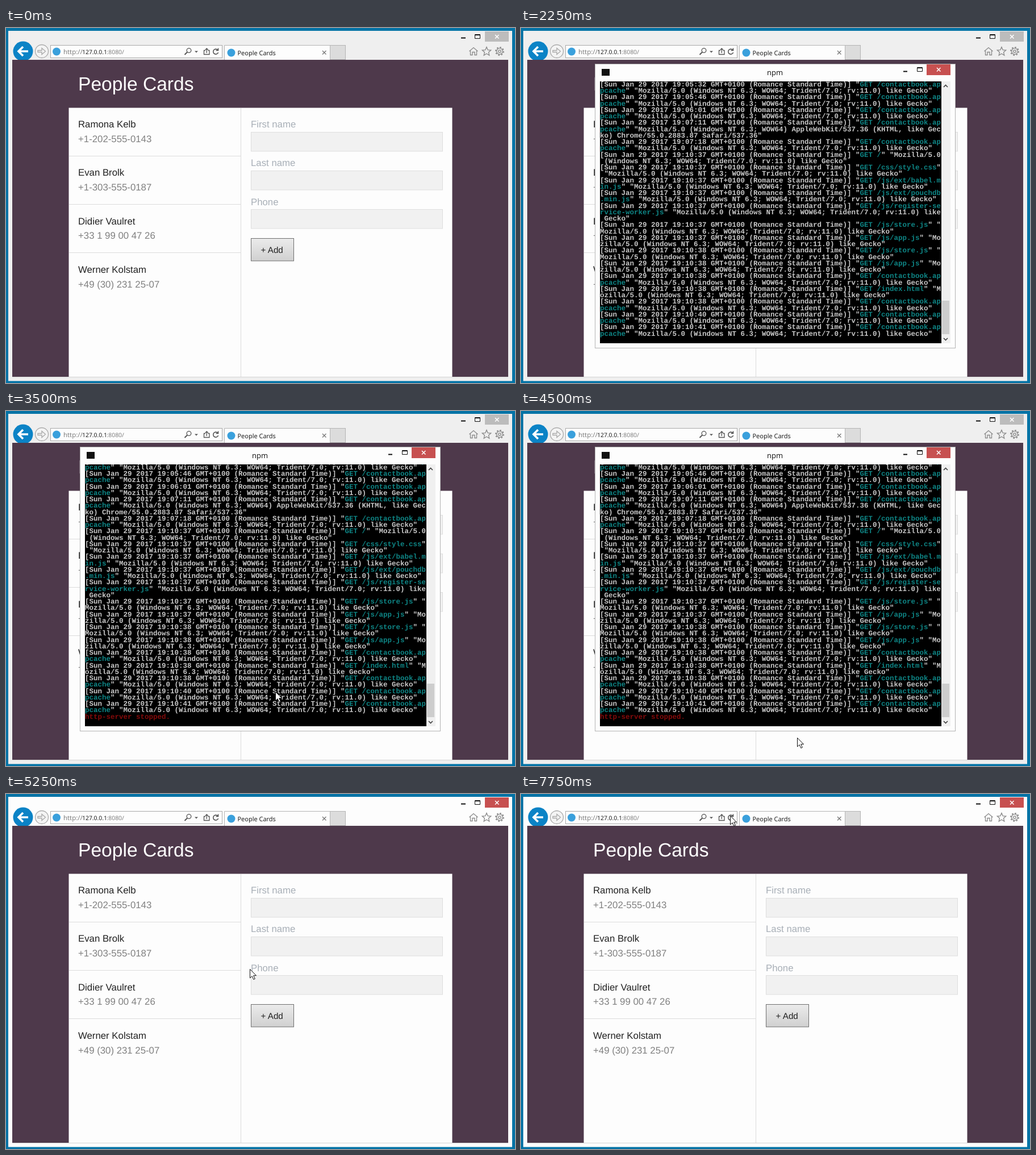
Recreate the animation shown at these times as an HTML page. Size 896 by 625 pixels, loop 8000 ms.

```html
<!DOCTYPE html>
<html lang="en">
<head>
<meta charset="utf-8">
<title>People Cards</title>
<style>
html, body { margin: 0; width: 100%; height: 100%; overflow: hidden; background: #0273a6; }
svg { display: block; width: 896px; height: 625px; text-rendering: geometricPrecision; }
.page { font: 16.8px "Liberation Sans", Arial, sans-serif; }
.ui { font: 11px "Open Sans", "Noto Sans", sans-serif; fill: #111; }
.url { font-size: 10.4px; }
.url .dim { fill: #777; }
.log { font: bold 12.5px "Liberation Mono", monospace; fill: #c8c8c8; }
.log text { white-space: pre; }
.log tspan { fill: #0e8585; }
.icon { fill: none; stroke: #777; stroke-width: 1.3; }
</style>
</head>
<body>
<svg viewBox="0 0 896 625">
  <defs>
    <linearGradient id="button" x2="0" y2="1">
      <stop stop-color="#ebebeb"/><stop offset="1" stop-color="#d0d0d0"/>
    </linearGradient>
  </defs>

  <rect width="896" height="625" fill="#0273a6"/>
  <rect id="frame" x="4" y="5" width="887" height="616.5"/>

  <g class="ui">
    <path d="M801 17.5h8" stroke="#111" stroke-width="2"/>
    <path d="M825.5 11.5h9v7h-9zM825.5 12.5h9" fill="none" stroke="#111"/>
    <rect id="close" x="843" y="6" width="42" height="18"/>
    <path d="M861 12l6.5 6.5m0-6.5l-6.5 6.5" stroke="#fff" stroke-width="1.5"/>

    <circle cx="30" cy="41" r="17.5" fill="#0b83c6"/>
    <path d="M39 41H22m8-8l-8 8 8 8" fill="none" stroke="#fff" stroke-width="3.6"/>
    <g class="icon" style="stroke:#aaa">
      <circle cx="63" cy="41" r="11.5" fill="#f4f4f4"/>
      <path d="M56 39.5h7v-4l6.5 5.5-6.5 5.5v-4h-7z"/>
    </g>

    <rect x="78.5" y="30.5" width="302" height="22" fill="#fdfdfd" stroke="#a9a9a9"/>
    <circle cx="89" cy="41.5" r="7" fill="#3aa0dc"/>
    <text class="url" y="46"><tspan class="dim" x="101" font-size="11.5">http://</tspan><tspan x="134">127.0.0.1</tspan><tspan class="dim" x="177.5">:8080/</tspan></text>
    <g class="icon" style="stroke:#555">
      <circle cx="322" cy="39.5" r="3.8"/><path d="M319 42.5l-4.5 4.5" stroke-width="2"/>
      <path d="M332 40.5h6l-3 3z" fill="#555" stroke="none"/>
      <path d="M351 39.5h-2.5v7h9.5v-7h-2.5M353.3 44v-8m-2.5 2.5l2.5-2.5 2.5 2.5"/>
      <path id="refresh" d="M373 39a4.5 4.5 0 1 0 .6 4M373.5 35.5v4h-4" stroke-width="1.6"/>
      <path id="stop" d="M365.5 38l7 7m0-7l-7 7" stroke="#b0333f" stroke-width="2"/>
    </g>

    <path d="M384.5 56V30.5h186V56" fill="#fdfdfd" stroke="#b5b5b5"/>
    <rect x="570.5" y="30.5" width="27" height="25" fill="#dcdcdc" stroke="#b5b5b5"/>
    <circle id="favicon" cx="396.5" cy="43.5" r="7" fill="#3aa0dc"/>
    <circle id="spinner" cx="396.5" cy="43.5" r="4.7" fill="none" stroke="#777" stroke-width="2" stroke-dasharray="24 5.5"/>
    <text x="407.5" y="48">People Cards</text>
    <path class="icon" d="M557 40l6.5 6.5m0-6.5l-6.5 6.5"/>

    <g class="icon" style="stroke:#8a8a8a">
      <path d="M815.5 41l7.5-6.5 7.5 6.5M817.5 40v7.5h3.5v-5h4v5h3.5V40"/>
      <path d="M846 33.5l2.2 5.1 5.5.5-4.2 3.6 1.3 5.4-4.8-2.9-4.8 2.9 1.3-5.4-4.2-3.6 5.5-.5z"/>
      <circle cx="869" cy="41" r="5.3"/><circle cx="869" cy="41" r="2.2"/>
      <circle cx="869" cy="41" r="6.9" stroke-width="2" stroke-dasharray="2.7 2.72"/>
    </g>
  </g>

  <rect x="11" y="56" width="873" height="559" fill="#4e394b"/>
  <g class="page">
    <text x="127" y="109.5" fill="#fff" font-size="33.6">People Cards</text>
    <rect x="110.5" y="140.5" width="675" height="474.5" fill="#fdfdfd"/>
    <path d="M413.5 141v474M111 225.5h302m-302 85h302m-302 85h302" stroke="#dcdcdc"/>
    <g id="contacts"></g>
    <g id="fields"></g>
    <rect x="431.5" y="370.5" width="75" height="39.5" fill="url(#button)" stroke="#6f6f6f"/>
    <text x="448.5" y="396" fill="#222" font-size="15.2">+ Add</text>
  </g>
  <path d="M11 614.5h873" stroke="#d4d4d4"/>

  <g id="terminal">
    <rect x="130.5" y="63.5" width="634" height="500" fill="#fdfdfd" stroke="#b4b4b4"/>
    <rect x="142" y="72" width="14" height="12" fill="#111"/>
    <text class="ui" x="447" y="83" text-anchor="middle" style="font-size:13px">npm</text>
    <path d="M673 76.5h7" stroke="#111" stroke-width="2"/>
    <path d="M697.5 69.5h9v7h-9zM697.5 70.5h9" fill="none" stroke="#111"/>
    <rect x="714" y="64" width="42" height="19" fill="#c75050"/>
    <path d="M732 70l6.5 6.5m0-6.5l-6.5 6.5" stroke="#fff" stroke-width="1.5"/>
    <rect x="139" y="94" width="601" height="461"/>
    <rect x="740" y="94" width="16" height="461" fill="#f0f0f0"/>
    <rect x="741" y="480" width="13" height="59" fill="#cdcdcd"/>
    <path d="M744 104l3.5-3.5 3.5 3.5M744 546l3.5 3.5 3.5-3.5" fill="none" stroke="#444" stroke-width="1.7"/>
    <svg x="139" y="94" style="width:601px;height:461px"><g class="log" id="log"></g></svg>
  </g>

  <path id="cursor" d="M.5.5v15.5l3.600-3.400 2.700 5.900 2.500-1.100-2.600-5.700h4.800z" fill="#fff" stroke="#111"/>
</svg>
<script>
const $ = id => document.getElementById(id);
const show = (id, on) => $(id).style.display = on ? '' : 'none';

const contacts = [
  ['Ramona Kelb', '+1-202-555-0143'],
  ['Evan Brolk', '+1-303-555-0187'],
  ['Didier Vaulret', '+33 1 99 00 47 26'],
  ['Werner Kolstam', '+49 (30) 231 25-07']
];
$('contacts').innerHTML = contacts.map(([name, phone], i) => `
  <text x="127" y="${175 + i * 85.3}" fill="#222">${name}</text>
  <text x="127" y="${200.7 + i * 85.3}" fill="#808080">${phone}</text>`).join('');
$('fields').innerHTML = ['First name', 'Last name', 'Phone'].map((label, i) => `
  <text x="431" y="${175 + i * 68.4}" fill="#a8afb7">${label}</text>
  <rect x="431.5" y="${183.5 + Math.floor(i * 68.4)}" width="337" height="33.5" fill="#f1f1f1" stroke="#dedede"/>`).join('');

// Server log, wrapped at 80 columns with the request highlighted
const cache = '/contactbook.appcache', store = '/js/store.js', app = '/js/app.js';
const trident = 'WOW64; Trident/7.0; rv:11.0) like Gecko';
const webkit = 'WOW64) AppleWebKit/537.36 (KHTML, like Gecko) Chrome/55.0.2883.87 Safari/537.36';
const requests = [
  ['05:32', cache], ['05:46', cache], ['06:01', cache], ['07:11', cache, webkit], ['07:18', cache],
  ['10:37', '/'], ['10:37', '/css/style.css'], ['10:37', '/js/ext/babel.min.js'],
  ['10:37', '/js/ext/pouchdb.min.js'], ['10:37', '/js/register-service-worker.js'],
  ['10:37', store], ['10:37', app], ['10:38', store], ['10:38', app], ['10:38', cache],
  ['10:38', '/index.html'], ['10:38', cache], ['10:40', cache], ['10:41', cache]
];
const COLUMNS = 80, ROW = 461 / 41;
const rows = requests.flatMap(([time, path, agent = trident]) => {
  const head = `[Sun Jan 29 2017 19:${time} GMT+0100 (Romance Standard Time)] "`;
  const end = head.length + 4 + path.length;
  const line = `${head}GET ${path}" "Mozilla/5.0 (Windows NT 6.3; ${agent}"`;
  const wrapped = [];
  for (let i = 0; i < line.length; i += COLUMNS) {
    const clamp = n => Math.max(i, Math.min(n, i + COLUMNS));
    const a = clamp(head.length), b = clamp(end);
    wrapped.push(`${line.slice(i, a)}<tspan>${line.slice(a, b)}</tspan>${line.slice(b, i + COLUMNS)}`);
  }
  return wrapped;
});
rows.push('<tspan id="stopped" style="fill:#850a0a">http-server stopped.</tspan>');
$('log').innerHTML = rows.map((row, i) => `<text y="${9 + i * ROW}">${row}</text>`).join('');

// Pointer path: step, x, y
const STEP = 250, STEPS = 32;
const path = [
  [1, 507, 434], [4, 483, 561], [5, 489, 539], [10, 480, 540], [13, 474, 494], [15, 474, 494],
  [18, 486, 575], [19, 486, 576], [23, 371, 39], [25, 371, 38], [27, 368, 38], [31, 368, 38]
];
function pointerAt(step) {
  const next = Math.max(1, path.findIndex(p => p[0] >= step));
  const [s0, x0, y0] = path[next - 1], [s1, x1, y1] = path[next];
  const u = Math.max(0, (step - s0) / (s1 - s0)), e = u * u * (3 - 2 * u);
  return [x0 + (x1 - x0) * e, y0 + (y1 - y0) * e].map(Math.round);
}

function draw(now) {
  const step = Math.floor(now / STEP) % STEPS;
  const stopped = step >= 14, active = step >= 19, loading = step >= 24 && step < 27;
  $('frame').setAttribute('fill', active ? '#fdfdfd' : '#efefef');
  $('close').setAttribute('fill', active ? '#c75050' : '#bcbcbc');
  show('terminal', step >= 9 && !active);
  show('stopped', stopped);
  $('log').setAttribute('transform', `translate(0 ${stopped ? -ROW : 0})`);
  show('refresh', !loading);
  show('stop', loading);
  show('favicon', !loading);
  show('spinner', loading);
  $('spinner').setAttribute('transform', `rotate(${(step - 25) * 90 - 30} 396.5 43.5)`);
  show('cursor', step >= 1 && step < 6 || step >= 10);
  $('cursor').setAttribute('transform', `translate(${pointerAt(step)})`);
  requestAnimationFrame(draw);
}
requestAnimationFrame(draw);
</script>
</body>
</html>
```
